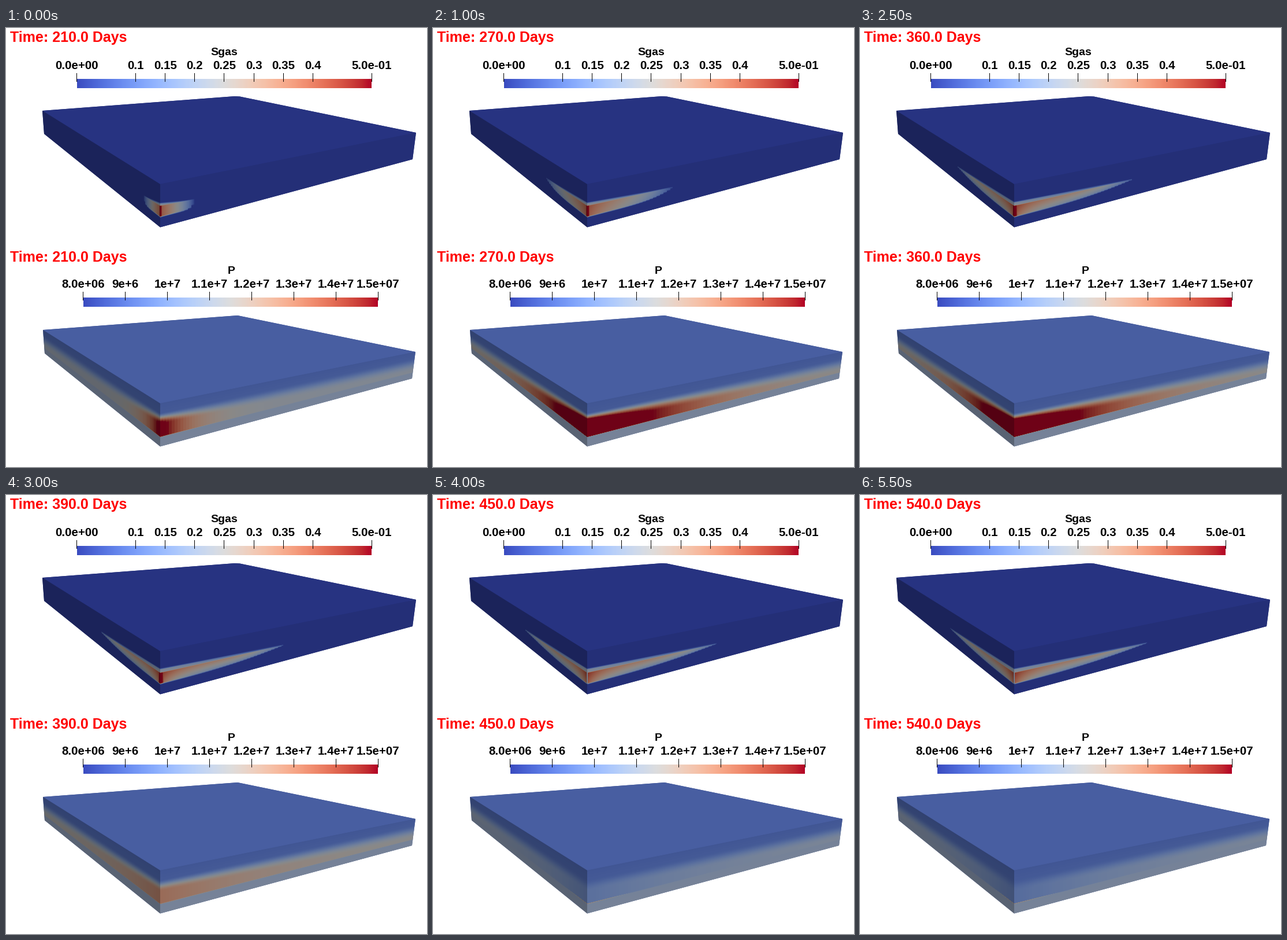
A matplotlib script for the animation above (6 s loop, 729 by 759 pixels).

```python
import numpy as np
import matplotlib.pyplot as plt
from matplotlib.animation import FuncAnimation
from matplotlib.patches import Polygon

W, H, DPI = 729, 759, 100
FRAMES, INTERVAL = 12, 500
FIRST_DAY, DAY_STEP, SHUT_IN_DAY = 210, 30, 375
CORNER_X = 267
LEFT_SCALE = 0.48          # foreshortening of the left face against the right one
SHADE = {"top": 0.67, "right": 0.62, "left": 0.47}
COOLWARM = plt.get_cmap("coolwarm")

plt.rcParams["font.family"] = "Liberation Sans"
plt.rcParams["font.weight"] = "bold"

fig = plt.figure(figsize=(W / DPI, H / DPI), dpi=DPI, facecolor="white")
ax = fig.add_axes([0, 0, 1, 1])
ax.axis("off")


def smooth(t):
    t = np.clip(t, 0, 1)
    return t * t * (3 - 2 * t)


def mix(a, b, t):
    return a + (b - a) * t


def saturation(day, d, v):
    """Gas plume at distance d from the well edge and relative depth v."""
    reach = 234 * (1 - np.exp(-(day - 185) / 85))
    power = 2.5 + 6.5 * np.exp(-(day - FIRST_DAY) / 60)
    age = min((day - FIRST_DAY) / 180, 1)
    q = np.clip(d / reach, 0, 1)
    q_cell = np.clip(np.floor(d / 6) * 6 / reach, 0, 1)

    floor = 0.535 + 0.225 * (1 - q_cell ** power)
    z = np.clip((v - 0.51) / np.maximum(floor - 0.51, 0.01), 0, 1)
    young = 0.4 * (1 - q) ** 0.7
    streak = (0.33 + 0.13 * np.exp(-8 * q)) * (1 - q ** 6)
    under = (0.2 + 0.2 * np.exp(-8 * q)) * (1 - 0.3 * z * np.sqrt(q))
    main = mix(young, mix(under, streak, 1 - z), age)
    if day < SHUT_IN_DAY + 2 * DAY_STEP:
        main = np.maximum(main, 0.52 * np.exp(-(d / (4 + 4 * age)) ** 4))
    else:
        main = np.where(d < 1.5, 0.22, main)

    haze_top = 0.42 - 0.03 * age + 0.11 * q
    haze = 0.22 * np.sqrt(1 - q) * smooth((v - haze_top) / 0.05)
    value = mix(haze, main, smooth((v - 0.485 - 0.035 * q) / 0.03))
    return 2 * value * smooth((floor - v) / 0.04 + 0.5) * (q < 1)


def pressure(day, d, v):
    """Pressure scaled to 0..1: a charged layer between two quiet ones."""
    if day < SHUT_IN_DAY:
        growth = min((day - FIRST_DAY) / 60, 1)
        peak, spread = 1.15 + 0.55 * growth, 50 + 90 * np.sqrt(growth)
    else:
        peak, spread = 0.24 + 0.46 * np.exp((SHUT_IN_DAY + 15 - day) / 20), 250
    cell = np.floor(d / 5) * 5 + 2.5
    layer = mix(0.45, peak, np.exp(-cell / spread))
    far = np.clip(d / 440, 0, 1)
    base = 0.15 + 0.06 * v
    value = mix(base, layer, smooth((v - 0.22) / (0.26 + 0.25 * far)))
    ramp = smooth((v - 0.45) / 0.4) * (0.3 + 0.7 * np.clip(d / 200, 0, 1))
    value = np.maximum(value, 0.14 + 0.24 * ramp)
    value = mix(value, 0.36 + 0.04 * v, smooth((v - 0.765) / 0.025))
    seam = 0.6 * np.exp(-((v - 0.778) / 0.014) ** 2 - (d / 110) ** 2)
    return np.maximum(value, seam)


class Face:
    """Side of a box between its near and far vertical edges (top, bottom)."""

    def __init__(self, name, near, far, field):
        (nx, nt), (_, nb) = near
        (tx, ty), (bx, by) = far
        x0, x1 = min(nx, tx, bx), max(nx, tx, bx)
        y0, y1 = np.floor(min(nt, ty)), np.ceil(max(nb, by))
        x, y = np.meshgrid(np.arange(x0, x1) + 0.5, np.arange(y0, y1) + 0.5)
        top = mix(nt, ty, (x - nx) / (tx - nx))
        bottom = mix(nb, by, (x - nx) / (bx - nx))
        self.v = np.clip((y - top) / (bottom - top), 0, 1)
        self.d = np.abs(x - nx) / (LEFT_SCALE if name == "left" else 1)
        self.field, self.shade = field, SHADE[name]
        self.image = ax.imshow(np.zeros(x.shape + (3,)), extent=(x0, x1, y1, y0),
                               aspect="auto", interpolation="nearest", zorder=3)
        outline = Polygon([near[0], far[0], far[1], near[1]], transform=ax.transData)
        self.image.set_clip_path(outline)

    def update(self, day):
        value = np.clip(self.field(day, self.d, self.v), 0, 1)
        self.image.set_data(COOLWARM(value)[..., :3] * self.shade)


def shaded(value, side):
    return np.array(COOLWARM(value)[:3]) * SHADE[side]


def label(x, y, text, size, color="black", ha="center"):
    return ax.text(x, y, text, fontsize=size * 72 / DPI, color=color,
                   ha=ha, va="baseline", zorder=5)


def color_bar(x, y, title, title_x, low, high, inner):
    ax.imshow(np.linspace(0, 1, 256)[None], cmap=COOLWARM, aspect="auto",
              extent=(x, x + 510, y + 16, y), interpolation="nearest", zorder=3)
    label(title_x, y - 41, title, 19.5)
    names = [f"{value:.2g}".replace("e+0", "e+") for value in inner]
    names = [f"{low:.1e}", *names, f"{high:.1e}"]
    for value, name in zip([low, *inner, high], names):
        tick_x = x - 1 + 511 * (value - low) / (high - low)
        ax.plot([tick_x, tick_x], [y - 10, y + 4], color="black", lw=0.72, zorder=4)
        label(tick_x + 0.5, y - 17, name, 20.5)


def box(near, left, right, back, top_value, field):
    ax.add_patch(Polygon([left[0], *back, right[0], right[1], near[1], left[1]],
                         fc=shaded(top_value, "right"), lw=0, zorder=1))
    ax.add_patch(Polygon([left[0], *back, right[0], near[0]],
                         fc=shaded(top_value, "top"), lw=0, zorder=2))
    return [Face("left", near, left, field), Face("right", near, right, field)]


color_bar(123, 88, "Sgas", 377.5, 0, 0.5, np.linspace(0.1, 0.4, 7))
color_bar(134, 466, "P", 390, 8e6, 15e6, np.linspace(9e6, 14e6, 6))

faces = box([(CORNER_X, 270), (CORNER_X, 344.5)], [(63, 143), (66, 183)],
            [(710, 181), (704, 227)], [(396, 118), (405, 118.5)], 0, saturation)
faces += box([(CORNER_X, 649), (CORNER_X, 723.5)], [(64, 522), (67, 562.5)],
             [(709, 560), (703, 606)], [(401, 497)], 0.155, pressure)
clocks = [label(7, y, "", 25, "red", "left") for y in (24, 404)]

ax.set_xlim(0, W)
ax.set_ylim(H, 0)


def draw(frame):
    day = FIRST_DAY + DAY_STEP * frame
    for clock in clocks:
        clock.set_text(f"Time: {day:.1f} Days")
    for face in faces:
        face.update(day)
    return clocks + [face.image for face in faces]


animation = FuncAnimation(fig, draw, frames=FRAMES, interval=INTERVAL,
                          repeat=True, repeat_delay=0)
plt.show()
```
